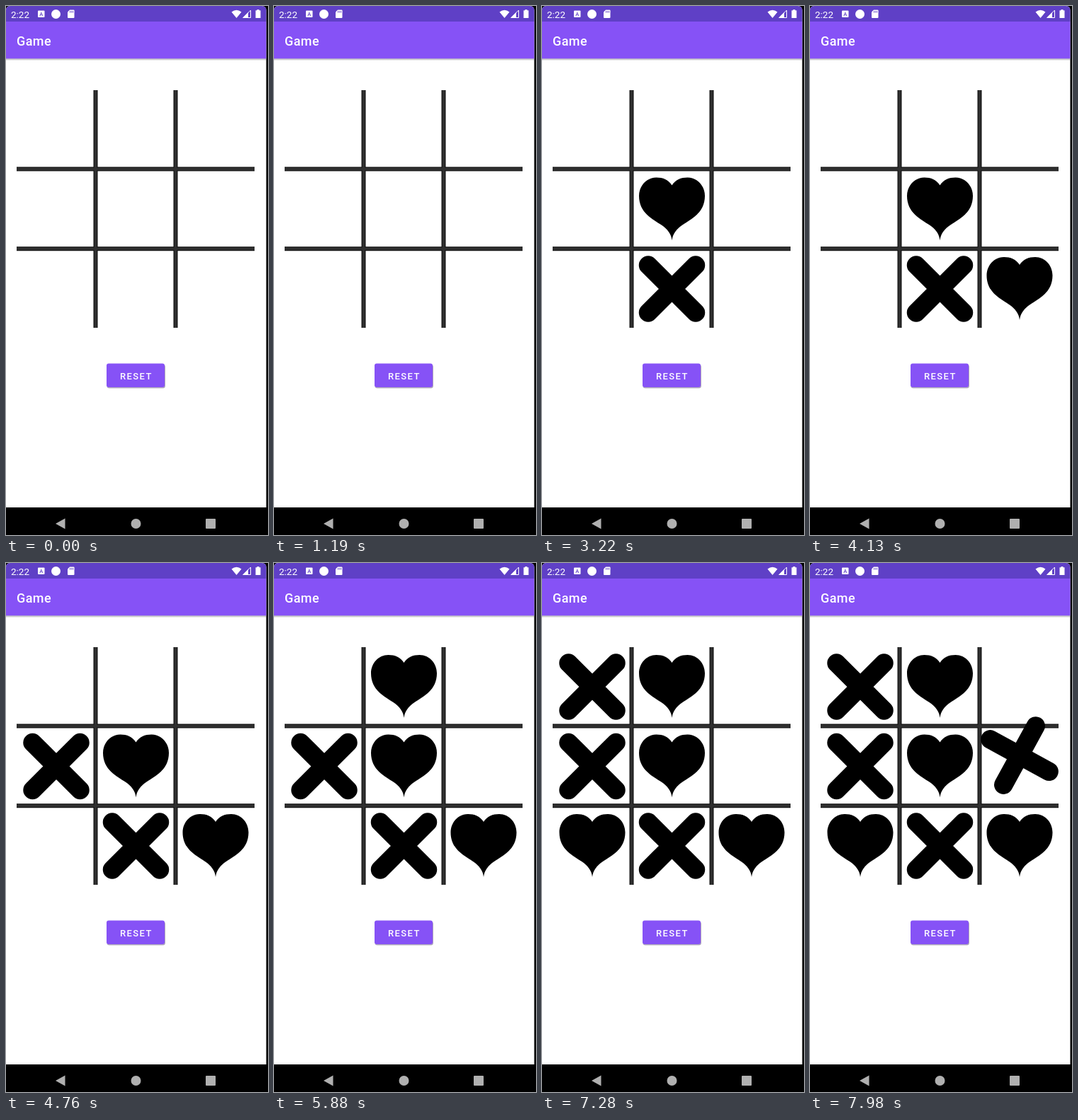
Animation, 370 px wide and 748 px high, one loop 8000 ms. Source, as an HTML page:

```html
<!DOCTYPE html>
<html lang="en">
<head>
<meta charset="utf-8">
<title>Game</title>
<style>
  html, body { margin: 0; width: 100%; height: 100%; overflow: hidden; background: #000; }
  svg { display: block; width: 100%; height: 100%; }
  text { font-family: Roboto, sans-serif; font-weight: 500; fill: #fff; }
</style>
</head>
<body>
<svg viewBox="0 0 370 748">
  <defs>
    <clipPath id="board"><path d="M15 119H351V455H15Z"/></clipPath>
    <clipPath id="screen"><path d="M0 709V6Q0 0 6 0H361Q367.500 0 367.500 6V709Z"/></clipPath>
    <linearGradient id="shade" x2="0" y2="1">
      <stop stop-color="#777" stop-opacity=".55"/>
      <stop offset="1" stop-color="#777" stop-opacity="0"/>
    </linearGradient>
    <path id="heart" d="M0-34C-5-42-13-45-22-45C-36-45-46.500-33-46.500-19C-46.500 5-27 14-15 22C-6 28-1 35 0 44C1 35 6 28 15 22C27 14 46.500 5 46.500-19C46.500-33 36-45 22-45C13-45 5-42 0-34Z"/>
    <path id="cross" d="M-33.500-33.500L33.500 33.500M33.500-33.500L-33.500 33.500" stroke="#000" stroke-width="26.500" stroke-linecap="round"/>
    <path id="lines" d="M126.500 119V455M239.500 119V455M15 230.500H351M15 343.200H351"/>
  </defs>

  <g clip-path="url(#screen)">
    <rect width="368" height="709" fill="#fff"/>
    <rect width="368" height="22" fill="#5f40c6"/>
    <rect y="22" width="368" height="52.500" fill="#8652f6"/>
    <rect y="74.500" width="368" height="3" fill="url(#shade)"/>
  </g>

  <text x="7" y="16.500" font-size="13.500" style="font-weight:400">2:22</text>
  <rect x="45" y="6.500" width="9.500" height="9.500" rx="1" fill="#fff"/>
  <text x="49.700" y="14" font-size="7.500" text-anchor="middle" style="fill:#5f40c6">A</text>
  <circle cx="70.500" cy="11.500" r="6.500" fill="#fff"/>
  <path d="M90 5.500H95.500Q96.500 5.500 96.500 6.500V16Q96.500 17 95.500 17H88Q87 17 87 16V8.500Z" fill="#fff"/>
  <path d="M90.500 7V9.500M92.500 7V9.500M94.500 7V9.500" stroke="#5f40c6" stroke-width=".9"/>
  <path d="M318.500 8.500Q325.500 3 332.500 8.500L325.500 17Z" fill="#fff"/>
  <path d="M345.500 6V16.500H335Z" fill="none" stroke="#fff"/>
  <path d="M342 9V17H334Z" fill="#fff"/>
  <path d="M354.500 5H357.500V6.300H359.500V17H352.500V6.300H354.500Z" fill="#fff"/>
  <text x="15" y="56" font-size="18" letter-spacing=".4">Game</text>

  <use href="#lines" stroke="#131313" stroke-width="6"/>
  <use href="#lines" stroke="#303030" stroke-width="3.500"/>
  <g id="pieces" clip-path="url(#board)"></g>

  <rect x="142.500" y="507" width="82.500" height="33.500" rx="3.500" fill="#6d6088" opacity=".55"/>
  <rect x="142" y="505.500" width="82" height="33.500" rx="3" fill="#8652f6"/>
  <text x="161" y="527.500" font-size="13" letter-spacing="1.400">RESET</text>

  <g fill="#b0b0b0">
    <path d="M70 732L83.500 724.500V739.500Z"/>
    <circle cx="183.500" cy="732" r="7"/>
    <rect x="282" y="725" width="14" height="14" rx="1"/>
  </g>
</svg>
<script>
  const LOOP = 8000, FALL = 300, DROP = 340, CELL = 112.5;
  // [start ms, column, row]; hearts and crosses take turns
  const moves = [
    [1567, 1, 1], [2490, 1, 2], [3410, 2, 2], [4340, 0, 1],
    [5220, 1, 0], [6100, 0, 0], [6910, 0, 2], [7722, 2, 1]
  ];
  const layer = document.getElementById('pieces');

  const pieces = moves.map(([start, col, row], i) => {
    const el = document.createElementNS('http://www.w3.org/2000/svg', 'use');
    el.setAttribute('href', i % 2 ? '#cross' : '#heart');
    layer.append(el);
    return { el, start, x: 71 + col * CELL, y: 175 + row * CELL };
  });

  const ease = p => (1 - Math.cos(Math.PI * p)) / 2;

  function draw(t) {
    for (const { el, start, x, y } of pieces) {
      const p = Math.min((t - start) / FALL, 1);
      el.style.display = p < 0 ? 'none' : '';
      if (p < 0) continue;
      const f = ease(p);
      el.setAttribute('transform', `translate(${x} ${y - DROP * (1 - f)}) rotate(${360 * f})`);
    }
  }

  const origin = performance.now();
  function tick() {
    draw((performance.now() - origin) % LOOP);
    requestAnimationFrame(tick);
  }
  tick();
</script>
</body>
</html>
```
